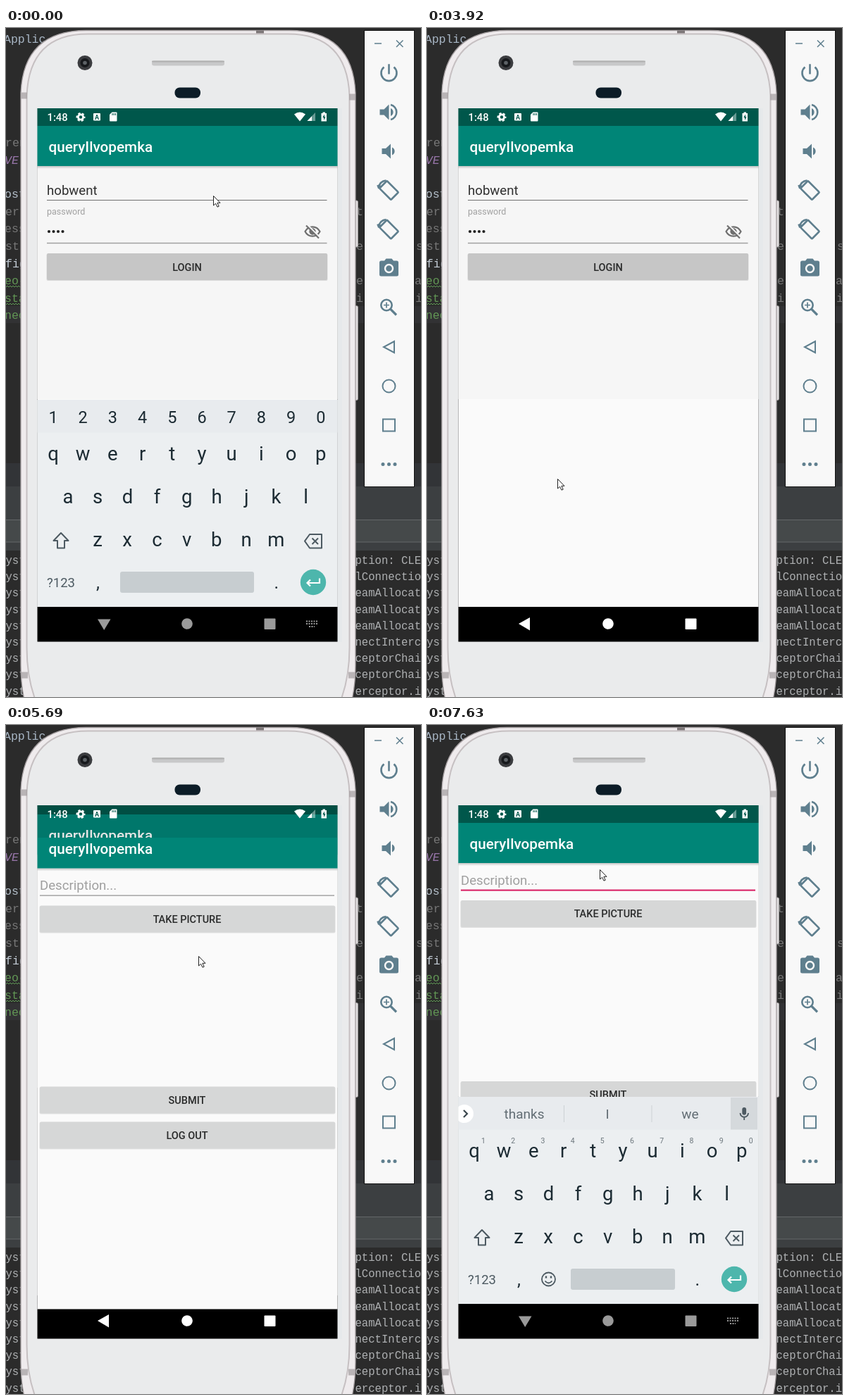
Recreate the animation shown at these times as an HTML page. Size 589x950 px, loop 8000 ms.

```html
<!DOCTYPE html>
<html lang="en">
<head>
<meta charset="utf-8">
<title>Phone login</title>
<style>
html, body { margin: 0; width: 100%; height: 100%; overflow: hidden; background: #2b2b2b; }
svg { display: block; width: 589px; height: 950px; }
text { font-family: Roboto, sans-serif; white-space: pre; }
.mono text { font-family: "Liberation Mono", monospace; }
.title { font-size: 20.7px; font-weight: 500; fill: #fff; }
.field { font-size: 18.65px; }
.mid { text-anchor: middle; }
.cap { font-size: 14.5px; font-weight: 500; fill: #2a2b2b; text-anchor: middle; }
.line { fill: none; stroke: #5f7f8e; stroke-width: 2.6; }
.solid { fill: #5f7f8e; }
</style>
</head>
<body>
<svg viewBox="0 0 589 950">
<defs>
  <clipPath id="screen"><rect x="44.5" y="114" width="426" height="757.5"/></clipPath>
  <clipPath id="above"><rect x="44" y="114" width="427" height="708"/></clipPath>
  <clipPath id="reveal"><rect id="revealBox" x="44" y="114" width="427" height="758"/></clipPath>
  <linearGradient id="drop" x2="0" y2="1">
    <stop offset="0" stop-opacity=".22"/><stop offset="1" stop-opacity="0"/>
  </linearGradient>
</defs>

<!-- editor and log behind the phone -->
<rect width="589" height="950" fill="#2b2b2b"/>
<rect y="395" width="589" height="24" fill="#323234"/>
<rect y="618" width="589" height="33" fill="#323437"/>
<rect y="651" width="589" height="91" fill="#3c3f41"/>
<rect x="-2" y="698.5" width="593" height="31.5" fill="#45494a" stroke="#646769"/>
<g class="mono" id="code" font-size="16.5"></g>
<g class="mono" id="log" font-size="15.6" fill="#aeb0b2"></g>

<!-- phone body -->
<g fill="#e2dfe0" stroke="#9b9798">
  <rect x="490" y="245" width="9.5" height="66" rx="2"/>
  <rect x="490" y="394.5" width="9.5" height="134" rx="2"/>
</g>
<path d="M27.5 960Q21 935 21 905V92Q25 3.500 114 3.500H402Q492 3.500 496 92V905Q496 935 489.500 960Z" fill="#efebed" stroke="#a59fa1" stroke-width="1.300"/>
<path d="M44 960Q29.500 925 29.500 880V96Q33 8.500 116 8.500H400Q484 8.500 487.500 96V880Q487.500 925 473 960Z" fill="#eaebec" stroke="#c6c0c2" stroke-width="2"/>
<path d="M21.500 96H30M487 98H496M21.500 919H31M486 919H495.500" stroke="#a39d9f" stroke-width="9" opacity=".7"/>
<path d="M355 5.500H366" stroke="#7d7778" stroke-width="4"/>
<circle cx="112" cy="49.500" r="10.500" fill="#3b3c3f"/>
<circle cx="112" cy="49.500" r="6.500" fill="#17191c"/>
<circle cx="112" cy="49.500" r="2.800" fill="#5d6266"/>
<rect x="207" y="46.500" width="103" height="7" rx="3" fill="#c8c8c9"/>
<rect x="207" y="46.500" width="103" height="2" rx="1" fill="#b0b0b0"/>
<rect x="239.500" y="84.500" width="36.500" height="15" rx="7" fill="#0c1c27"/>
<rect x="470.500" y="114" width="6.500" height="758" fill="#e6e9eb"/>

<g clip-path="url(#screen)">
  <rect x="44" y="114" width="427" height="758" fill="#000"/>

  <g id="login">
    <rect x="44" y="114" width="427" height="708" fill="#fafafa"/>
    <rect x="44" y="114" width="427" height="413" fill="#f6f6f6"/>
    <g class="appbar"></g>
    <text class="field" x="58" y="236.500" fill="#2f2f2f">hobwent</text>
    <path d="M58 244.500H455.500" stroke="#707070"/>
    <text x="58" y="265" font-size="12.500" fill="#a0a0a0">password</text>
    <g id="dots" fill="#222"></g>
    <g transform="translate(435 289)" fill="none" stroke="#707070" stroke-width="2.200">
      <path d="M-10.500 0Q-7-6.700 0-6.700T10.500 0Q7 6.700 0 6.700T-10.500 0Z"/>
      <circle r="3.600" fill="#707070"/>
      <path d="M-7.500-9.800L10.500 8.200" stroke="#f6f6f6"/>
      <path d="M-9-8.500L9 9.500"/>
    </g>
    <path d="M58 305.500H455.500" stroke="#a0a0a0" stroke-width="1.400"/>
    <rect x="57.500" y="320.500" width="399" height="38.500" rx="2" fill="#000" opacity=".1"/>
    <rect id="loginBtn" x="58" y="320" width="398" height="38" rx="2"/>
    <text class="cap" x="257" y="344.500">LOGIN</text>
  </g>
  <rect id="shade" x="44" y="114" width="427" height="708"/>

  <g clip-path="url(#reveal)"><g id="home">
    <rect x="44" y="114" width="427" height="708" fill="#fafafa"/>
    <g class="appbar"></g>
    <text class="field" x="48" y="226.500" fill="#a0a0a0">Description...</text>
    <rect id="underline" x="48" width="418"/>
    <g id="homeBtns"></g>
  </g></g>

  <!-- status icons -->
  <g fill="#fff">
    <text x="58.500" y="131.500" font-size="14.800" font-weight="500">1:48</text>
    <g transform="translate(106 126.500)" fill="none" stroke="#fff">
      <circle r="3.600" stroke-width="2.800"/>
      <circle r="5.400" stroke-width="2.200" stroke-dasharray="3.100 2.555" stroke-dashoffset="1.5"/>
    </g>
    <rect x="124" y="121" width="10" height="10.500" rx="1"/>
    <text class="mid" x="129" y="129.500" font-size="9" font-weight="700" style="fill:#00574b">A</text>
    <path d="M150.500 119.500H156.500Q157.500 119.500 157.500 120.500V131.500Q157.500 132.500 156.500 132.500H148Q147 132.500 147 131.500V123Z"/>
    <path d="M151 121v3M153.200 121v3M155.400 121v3" stroke="#00574b"/>
    <path d="M409 122.500Q417 116.500 425 122.500L417 132.500Z"/>
    <path d="M439 120V132H427.500Z" opacity=".4"/><path d="M434 125.200V132H427.500Z"/>
    <path d="M447.500 121H449.500V119.500H453V121H455V132.500H447.500Z"/>
    <path d="M452 122.500L449.300 127.300H451V131L453.600 126.200H452Z" fill="#00574b"/>
  </g>

  <!-- keyboard -->
  <g clip-path="url(#above)"><g id="board" fill="#1c2b33">
    <rect x="44" y="528" width="427" height="294" fill="#eceff1"/>
    <rect x="44" y="528" width="427" height="46.500" fill="#e8ebee"/>
    <g id="keys"></g>
    <g id="plain"><rect x="162" y="772" width="190" height="30" rx="3" fill="#c7cdd0"/></g>
    <g id="rich">
      <rect x="204" y="772" width="148" height="30" rx="3" fill="#c7cdd0"/>
      <rect x="431" y="529" width="38" height="45.500" fill="#d5d9dc"/>
      <circle cx="53" cy="552" r="13" fill="#fff"/>
      <path d="M52 547L57 552L52 557" fill="none" stroke="#3b474e" stroke-width="2.200"/>
      <path d="M194.500 540V564M319 540V564" stroke="#cdd2d5"/>
      <g class="mid" font-size="19" fill="#626d74">
        <text x="138" y="559">thanks</text><text x="256" y="559">I</text><text x="373.500" y="559">we</text>
      </g>
      <g fill="none" stroke="#4d5a62" stroke-width="1.800">
        <rect x="448.200" y="543.800" width="4" height="9" rx="2" fill="#4d5a62"/>
        <path d="M444.500 551A5.700 5.700 0 0 0 456 551M450.200 557V561"/>
        <circle cx="172.500" cy="787" r="9.500"/>
        <path d="M167.500 789.500Q172.500 795.500 177.500 789.500"/>
        <path d="M169 782.500V785.500M176 782.500V785.500" stroke-width="2.400"/>
      </g>
    </g>
    <g fill="none" stroke="#4d5a62" stroke-width="2" stroke-linejoin="round">
      <path d="M78 717L88.500 728H83V738.500H73V728H67.500Z"/>
      <path d="M431 719H448V738.500H431L424 728.700Z"/>
      <path d="M434.500 724.500L443 733M443 724.500L434.500 733"/>
    </g>
    <circle cx="436" cy="787" r="18.200" fill="#4db6ac"/>
    <path d="M445 781.500V788H428M432 783.500L427.500 788L432 792.500" fill="none" stroke="#fff" stroke-width="2.200"/>
  </g></g>

  <g id="nav">
    <g id="navBoard">
      <path d="M130 839.500H148.500L139.200 855Z"/>
      <path id="navKeys" d="M426 842.500H442M426 846H442M430 850H438" stroke-width="2" stroke-dasharray="2 1.500"/>
    </g>
    <path id="navBack" d="M130 846L146 837V855.500Z"/>
    <circle cx="257" cy="846" r="7.800"/>
    <rect x="366.500" y="838.500" width="16" height="15.500" rx="1"/>
  </g>
</g>

<!-- emulator tools -->
<rect x="508.500" y="3.500" width="71" height="648" fill="#f8f8f8" stroke="#111"/>
<path class="line" d="M523 22H533M554 17.500L563.500 27M563.500 17.500L554 27" style="stroke-width:1.500"/>
<g class="line">
  <path transform="translate(543.500 64)" d="M0-12.700V1.500M-7-8.400A11 11 0 1 0 7-8.400"/>
  <g transform="translate(543.500 119.500)">
    <path class="solid" stroke="none" d="M-13-4H-7L0-11V11L-7 4H-13ZM2.500-5.500A6 6 0 0 1 2.500 5.500Z"/>
    <path d="M2.500-10.500A10.800 10.800 0 0 1 2.500 10.500"/>
  </g>
  <path class="solid" stroke="none" transform="translate(543.500 175)" d="M-10-4H-4.500L2.500-10.500V10.500L-4.500 4H-10ZM4.500-5.500A6 6 0 0 1 4.500 5.500Z"/>
  <g id="turns" stroke-linejoin="round"></g>
  <path class="solid" stroke="none" d="M539.500 327.500H547.500L550 330.500H554.500Q557 330.500 557 333V350Q557 352.500 554.500 352.500H532.500Q530 352.500 530 350V333Q530 330.500 532.500 330.500H537Z"/>
  <circle cx="543.500" cy="341.500" r="5.500" style="stroke:#f8f8f8;stroke-width:2.400"/>
  <circle cx="540" cy="393.500" r="7.700"/>
  <path d="M545.500 399L554 407.500" style="stroke-width:3.200"/>
  <path d="M536 393.500H544M540 389.500V397.500" style="stroke-width:1.700"/>
  <path d="M551 445V461L536 453Z" style="stroke-width:2"/>
  <circle cx="543.500" cy="508.500" r="9" style="stroke-width:2"/>
  <rect x="535" y="555.500" width="17" height="17" style="stroke-width:2"/>
  <path d="M535 619.500h0M543.500 619.500h0M552 619.500h0" stroke-linecap="round" style="stroke-width:5"/>
</g>

<path id="cursor" d="M.5.500V14L3.600 11.200L6 16.200L8.200 15.200L5.900 10.300H10Z" fill="#fff" stroke="#222"/>
</svg>

<script>
const $ = id => document.getElementById(id);
const txt = (x, y, s, extra = '') => `<text x="${x}" y="${y}" ${extra}>${s}</text>`;
const PITCH = 42.2;

// static repeats
$('code').innerHTML = [
  [-3, 21, 'Applic', '#a9b7c6'], [-1, 168, 'ren', '#777'], [-2, 193, 'VE', '#9876aa'],
  [-2, 241, 'ost', '#b5c0cb'], [-1, 266, 'er', '#777'], [-2, 290, 'ess', '#777'],
  [-1, 315, 'st', '#777'], [-1, 340, 'fig', '#c3ccd5'], [-2, 364, 'eo-', '#629755'],
  [-2, 389, 'sta', '#629755'], [-2, 413, 'nec', '#629755'],
  [497, 266, 't', '#777'], [497, 315, 'e', '#777'], [497, 364, 'e', '#777'], [497, 389, 'i', '#777'],
  [582, 315, 's', '#777'], [580, 364, 'a', '#777'], [581, 389, 'i', '#777']
].map(([x, y, s, c]) => txt(x, y, s, `fill="${c}"${s === 'VE' ? ' font-style="italic"' : ''}`)).join('')
  + [368, 393].map(y => `<path d="M0 ${y}${'l2-2l2 2'.repeat(5)}" fill="none" stroke="#5f9a55"/>`).join('');

const tails = ['ption: CLE', 'lConnectio', 'eamAllocat', 'eamAllocat', 'eamAllocat',
  'nectInterc', 'ceptorChai', 'ceptorChai', 'erceptor.i'];
$('log').innerHTML = tails.map((s, i) => {
  const y = 761 + i * 23.2;
  return txt(-.5, y, 'yst') + txt(495.5, y, s);
}).join('');

document.querySelectorAll('.appbar').forEach(g => g.innerHTML =
  `<rect x="44" y="196" width="427" height="4" fill="url(#drop)"/>
   <rect x="44" y="114" width="427" height="25" fill="#00574b"/>
   <rect x="44" y="139" width="427" height="57" fill="#008577"/>` +
  txt(60.5, 175.5, 'queryIlvopemka', 'class="title"'));

$('dots').innerHTML = [0, 1, 2, 3].map(i => `<circle cx="${61 + i * 6.5}" cy="289" r="2.100"/>`).join('');

$('homeBtns').innerHTML = [[249, 'TAKE PICTURE'], [506, 'SUBMIT'], [556, 'LOG OUT']].map(([y, s]) =>
  `<rect x="47.500" y="${y + .5}" width="420" height="38.500" rx="2" opacity=".1"/>
   <rect x="48" y="${y}" width="419" height="38" rx="2" fill="#d6d7d7"/>` +
  txt(257, y + 24, s, 'class="cap"')).join('');

const row = (chars, x, y, size, extra = '') => `<g class="mid" font-size="${size}" ${extra}>` +
  [...chars].map((c, i) => txt(x + i * PITCH, y, c)).join('') + '</g>';
$('keys').innerHTML = row('qwertyuiop', 67, 614, 27.5) + row('asdfghjkl', 88, 674.5, 27.5) +
  row('zxcvbnm', 130, 736, 27.5) + row(',     .', 130.5, 796, 25) +
  txt(78, 793.5, '?123', 'class="mid" font-size="18.500" fill="#4d5a62"');
$('plain').innerHTML += row('1234567890', 67, 561, 23.5);
$('rich').innerHTML += row('1234567890', 80, 594, 10.5, 'fill="#6d777d"');

const turn = '<rect x="-7.500" y="-11.500" width="15" height="23" rx="1" transform="rotate(-45)"/>' +
  '<path d="M-14-4Q-13-13-4-14.500M-7.500-16L-3.500-14.500L-6-11"/>';
$('turns').innerHTML = `<g transform="translate(543.500 230.500) scale(-1 1) rotate(90)">${turn}</g>
  <g transform="translate(543.500 286) rotate(90) scale(-1 1) rotate(180)">${turn}</g>`;

// step tables: time, then the values held from that time on
const LOOP = 8000;
const tracks = {
  cursor: [[0, 294, 238], [500, 294, 245], [650, 291, 290], [770, 286, 345], [890, 281, 392],
    [1510, 268, 438], [1630, 256, 477], [1790, 254, 479], [2060, 235, 519], [2180, 161, 743],
    [2340, 158, 753], [2610, 157, 760], [2730, 156, 766], [2880, 140, 825], [3000, 112, 885],
    [3120, 116, 845], [3270, 120, 846], [3390, 126, 846], [3510, 130, 846], [3920, 185, 640],
    [4040, 254, 413], [4200, 272, 387], [4350, 273, 347], [4500, 273, 328], [6240, 280, 342],
    [6360, 288, 352], [6480, 292, 354], [6600, 272, 290], [6720, 250, 212], [6880, 245, 205]],
  board: [[0, 0], [3780, 110], [3920, 294], [7510, 130], [7630, 0]],
  navTone: [[0, 154], [3660, 205], [3780, 255], [6240, 240], [6360, 224], [6480, 208],
    [6600, 192], [6720, 176], [6880, 160], [7510, 154]],
  button: [[0, 198], [4750, 207], [4870, 214]],
  // home offset, reveal edge, login offset, shade
  swap: [[0, 0, 872, 0, 0], [5570, 25, 520, -3, .03], [5690, 7.5, 160, -12, .1],
    [5810, 1.5, 118, -15, .1], [5930, 0, 114, 0, 0]],
  focus: [[0, 0], [7020, 1]]
};
const at = (name, t) => tracks[name].findLast(s => s[0] <= t).slice(1);
const move = (id, x, y) => $(id).setAttribute('transform', `translate(${x} ${y})`);
const show = (id, on) => $(id).style.display = on ? '' : 'none';
const grey = v => `rgb(${v},${v},${v})`;

function draw(now) {
  const t = now % LOOP;
  const [cx, cy] = at('cursor', t), [drop] = at('board', t), [tone] = at('navTone', t);
  const [homeY, edge, loginY, shade] = at('swap', t), [focus] = at('focus', t);
  move('cursor', cx, cy);
  move('board', 0, drop);
  move('home', 0, homeY);
  move('login', 0, loginY);
  $('revealBox').setAttribute('y', edge);
  $('shade').setAttribute('opacity', shade);
  $('loginBtn').setAttribute('fill', grey(at('button', t)[0]));
  $('nav').setAttribute('fill', grey(tone));
  $('navKeys').setAttribute('stroke', grey(tone));
  const up = drop < 200;
  show('board', drop < 294);
  show('plain', t < 5000);
  show('rich', t > 5000);
  show('navBoard', up);
  show('navBack', !up);
  const line = $('underline');
  line.setAttribute('y', focus ? 233.6 : 234);
  line.setAttribute('height', focus ? 2 : 1.2);
  line.setAttribute('fill', focus ? '#d81b60' : '#8f8f8f');
}

function tick() {
  draw(performance.now());
  requestAnimationFrame(tick);
}
tick();
</script>
</body>
</html>
```
